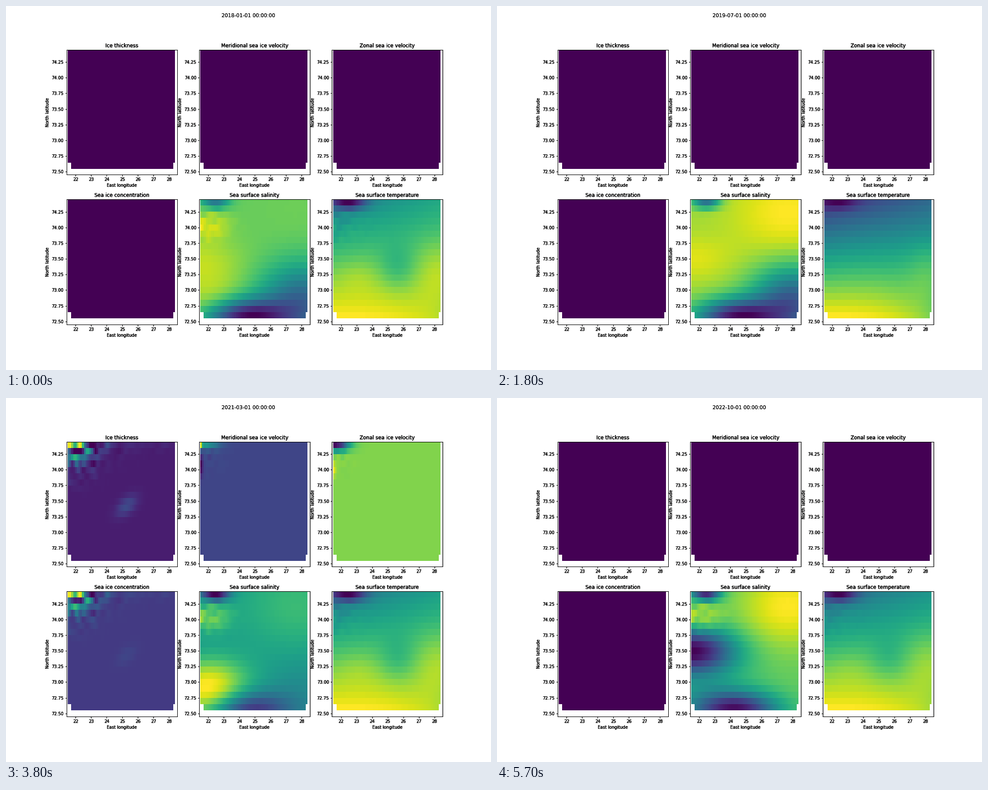
A matplotlib script for the animation above (5.8 s loop, 864 by 648 pixels).

```python
import numpy as np
import matplotlib.pyplot as plt
from matplotlib.animation import FuncAnimation

MONTHS = 58
NY, NX = 19, 60
LON, LAT = (21.423, 28.52), (72.45, 74.45)
TITLES = ["Ice thickness", "Meridional sea ice velocity", "Zonal sea ice velocity",
          "Sea ice concentration", "Sea surface salinity", "Sea surface temperature"]

# u runs east and v runs south, both from 0 to 1
u, v = np.meshgrid((np.arange(NX) + 0.5) / NX, np.arange(NY) / (NY - 1))

# Grid cells without data
hole = np.zeros((NY, NX), bool)
hole[-1, :2] = hole[-1, -1:] = True


def bump(x, y, sx, sy):
    return np.exp(-((u - x) / sx) ** 2 - ((v - y) / sy) ** 2)


def unit(a):
    return (a - a.min()) / (a.max() - a.min())


def noise(seed):
    """Row-wise noise, smoothed along x."""
    k = np.hanning(7)
    rows = np.random.default_rng(seed).normal(size=(NY, NX + 6))
    return np.array([np.convolve(r, k / np.linalg.norm(k), "valid") for r in rows])


def winter(m):
    """1 in January, 0 in July."""
    return np.sqrt(max(0, 0.5 + 0.5 * np.cos(2 * np.pi * m / 12)))


corner = bump(0.05, 0.2, 0.2, 0.13)
rough = noise(4) * corner

# Salinity features: south pool, south-east, west tongue, north-east, west
features = np.array([
    bump(0.42, 1.02, 0.38, 0.16), bump(0.95, 0.88, 0.4, 0.33),
    bump(0.08, 0.85, 0.35, 0.28), bump(0.9, 0.1, 0.5, 0.4),
    bump(0.0, 0.5, 0.4, 0.2),
])
# Base level and feature strengths at a few months
salt_keys = {
    0: (0.82, -0.75, -0.45, 0.15, 0.02, 0.12),
    11: (0.68, -0.55, -0.42, -0.05, -0.05, 0.0),
    18: (0.85, -0.6, -0.45, 0.0, 0.12, 0.08),
    30: (0.82, -0.15, 0.0, 0.02, 0.18, -0.1),
    38: (0.66, -0.3, -0.05, 0.32, 0.08, -0.03),
    49: (0.42, -0.45, 0.15, 0.58, -0.06, -0.06),
    57: (0.8, -0.4, 0.03, -0.05, 0.18, -0.42),
}


def salinity(m):
    base, *amps = (np.interp(m, list(salt_keys), c) for c in zip(*salt_keys.values()))
    f = base + np.tensordot(amps, features, 1)
    f -= 0.38 * bump(0.14, 0, 0.13, 0.06)
    return unit(f + winter(m) * (0.18 * corner + 0.04 * rough))


def temperature(m):
    w = winter(m)
    north = 0.15 + 0.29 * w + (0.2 - 0.03 * w) * u
    south = 1 - (0.24 - 0.1 * w) * u ** 3
    f = north + (south - north) * v
    f += 0.13 * bump(1, 0.6, 0.22, 0.3) + 0.05 * w * bump(0.22, 0.65, 0.2, 0.15)
    f -= 0.12 * w * bump(0.6, 0.58, 0.17, 0.2)
    f -= (0.18 + 0.28 * w) * bump(0.14, 0, 0.17, 0.065)
    return unit(f + 0.03 * w * rough)


zero = np.zeros((NY, NX))
shore = bump(0, 0, 0.24, 0.2) + 0.2 * np.exp(-u / 0.5 - v / 0.06)
streak = np.exp(-((u - 0.98 + 0.8 * v) / 0.1) ** 2) * bump(0.55, 0.54, 0.15, 0.1)
edge = bump(0, 0.2, 0.025, 0.08)


def patches(base, seed):
    """Ice thinning out from the north-west corner."""
    f = shore * (0.45 + 0.45 * noise(seed))
    return base + (1 - base) * f / f.max()


def ice(m):
    """Thickness, northward and eastward velocity, concentration."""
    if m == 0 or m % 12 > 3:
        return (zero,) * 4
    drifting = m % 12 > 1
    thick = patches(0.08, m)
    conc = patches(0.17 if drifting else 0.05, m)
    if not drifting:
        return thick, zero, zero, conc
    swirl = noise(m + MONTHS) * bump(0, 0.08, 0.13, 0.12)
    north = (0.21 + 0.3 * bump(0.05, 0, 0.13, 0.05) + 0.6 * bump(0, 0, 0.02, 0.03)
             - 0.21 * edge + 0.07 * swirl)
    east = 0.81 - 0.75 * bump(0.03, 0, 0.12, 0.05) + 0.19 * edge + 0.07 * swirl
    return thick + 0.15 * streak, north, east, conc + 0.04 * streak


plt.rcParams.update({"font.family": "DejaVu Sans", "font.size": 10})
fig, grid = plt.subplots(2, 3, figsize=(16, 12), dpi=54)
fig.subplots_adjust(left=0.125, right=0.9, bottom=0.125, top=0.88, wspace=0.2, hspace=0.2)
panels = grid.ravel()
for ax, title in zip(panels, TITLES):
    ax.set(title=title, xlabel="East longitude", ylabel="North latitude",
           xlim=LON, ylim=LAT, xticks=range(22, 29), yticks=np.arange(72.5, 74.5, 0.25))

# Bake frames and labels at 72 dpi, reduce by 3/4 and darken into one overlay
fig.set_dpi(72)
fig.canvas.draw()
gray = np.array(fig.canvas.buffer_rgba())[..., 0] / 255
fig.set_dpi(54)
gray = gray.repeat(3, 0).repeat(3, 1).reshape(648, 4, 864, 4).mean((1, 3))
ink = np.zeros(gray.shape + (4,))
ink[..., 3] = 1 - gray ** 2.5
fig.figimage(ink, zorder=5)

images = []
for ax in panels:
    ax.set_title("")
    ax.axis("off")
    images.append(ax.imshow(zero, cmap="viridis", vmin=0, vmax=1, aspect="auto",
                            interpolation="nearest", extent=(21.5, 28.35, 72.545, 74.45)))
    ax.set(xlim=LON, ylim=LAT)
dates = [fig.text(0.5, 0.98, "", size=12, ha="center", va="top") for _ in range(2)]


def update(m):
    for image, f in zip(images, (*ice(m), salinity(m), temperature(m))):
        image.set_data(np.ma.array(f, mask=hole))
    for text in dates:
        text.set_text(f"{2018 + m // 12}-{m % 12 + 1:02d}-01 00:00:00")
    return images + dates


anim = FuncAnimation(fig, update, frames=MONTHS, interval=100, repeat=True, repeat_delay=0)
plt.show()
```
